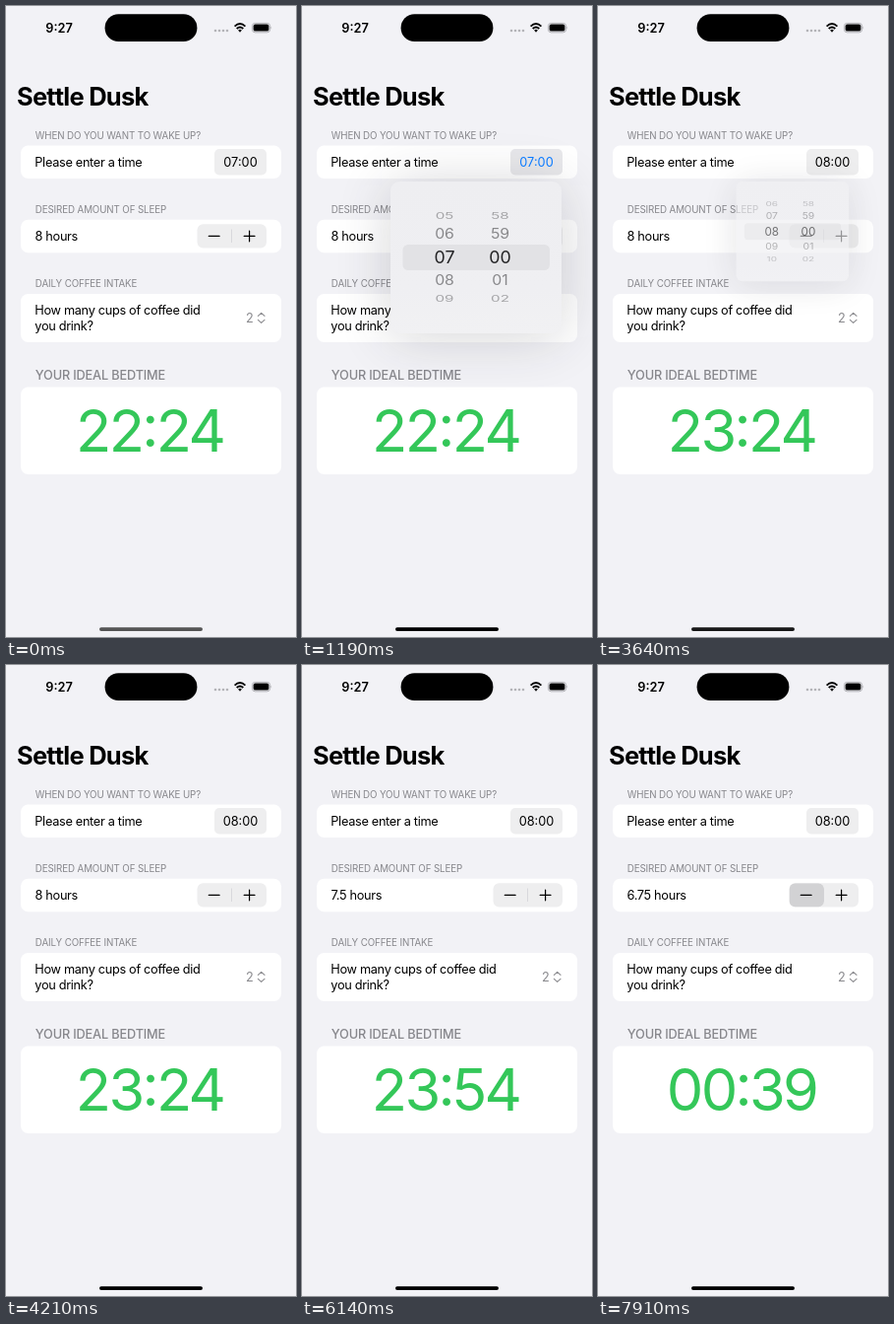
Write an HTML page that moves like this. It is 295 px wide and 640 px high and loops after 8 s.

```html
<!DOCTYPE html>
<html lang="en">
<head>
<meta charset="utf-8">
<title>Settle Dusk</title>
<style>
  html, body { margin: 0; width: 100%; height: 100%; overflow: hidden; background: #f2f2f6; }
  svg { display: block; width: 100%; height: 100%; }
  text { font-family: Inter, Roboto, sans-serif; font-feature-settings: "calt" 0; white-space: pre; }
  .body { font-size: 12.75px; letter-spacing: -0.025em; }
  .head { font-size: 9.75px; letter-spacing: -0.012em; fill: #86868b; }
  .mid { text-anchor: middle; }
</style>
</head>
<body>
<svg id="stage" viewBox="0 0 295 640">
  <defs>
    <filter id="soft" x="-75%" y="-75%" width="250%" height="250%"><feGaussianBlur stdDeviation="28"/></filter>
    <linearGradient id="glass" x1="0" y1="0" x2="0" y2="1">
      <stop offset="0" stop-color="#eeeef1"/>
      <stop offset="0.7" stop-color="#efeff2"/>
      <stop offset="1" stop-color="#f1f1f3"/>
    </linearGradient>
  </defs>
  <rect width="295" height="640" fill="#f2f2f6"/>

  <!-- status bar -->
  <text id="now" class="mid" x="54" y="26.6" font-size="12.75" font-weight="600"></text>
  <rect x="100.6" y="8.3" width="93.8" height="27.7" rx="13.85"/>
  <g fill="#b4b4b8">
    <circle cx="213" cy="25" r="1.3"/><circle cx="217" cy="25" r="1.3"/>
    <circle cx="221" cy="25" r="1.3"/><circle cx="225" cy="25" r="1.3"/>
  </g>
  <g fill="none" stroke="#000" stroke-width="1.9">
    <path d="M232.6 20.6Q238 15.6 243.4 20.6"/>
    <path d="M234.7 23Q238 20 241.3 23"/>
  </g>
  <path d="M236.1 24.6Q238 23 239.9 24.6L238 26.7Z"/>
  <rect x="250.4" y="17.4" width="18.2" height="9.4" rx="3" fill="none" stroke="#a3a3a7" stroke-width="0.8"/>
  <rect x="251.6" y="18.6" width="15.8" height="7" rx="1.9"/>
  <path d="M269.5 20.6q1.4 1.5 0 3z" fill="#a3a3a7"/>

  <text x="11" y="100.5" font-size="25.5" font-weight="700" letter-spacing="-0.03em">Settle Dusk</text>

  <text class="head" x="29.8" y="134.6">WHEN DO YOU WANT TO WAKE UP?</text>
  <text class="head" x="29.8" y="209.8">DESIRED AMOUNT OF SLEEP</text>
  <text class="head" x="29.8" y="285.2">DAILY COFFEE INTAKE</text>
  <text x="29.8" y="378.8" font-size="12.75" font-weight="500" letter-spacing="-0.013em" fill="#86868b">YOUR IDEAL BEDTIME</text>

  <g fill="#fff">
    <rect x="15" y="141.5" width="265" height="33.5" rx="7.5"/>
    <rect x="15" y="216.8" width="265" height="33.4" rx="7.5"/>
    <rect x="15" y="292" width="265" height="49" rx="7.5"/>
    <rect x="15" y="386.5" width="265" height="88.5" rx="7.5"/>
  </g>

  <text class="body" x="29.3" y="163">Please enter a time</text>
  <rect id="chip" x="212" y="145" width="53" height="26.5" rx="5"/>

  <text id="sleep" class="body" x="29.5" y="238.3"></text>
  <rect x="194.5" y="221.3" width="70.5" height="24.2" rx="6" fill="#eeeeef"/>
  <rect x="229.2" y="226.5" width="0.8" height="13.5" fill="#d3d3d7"/>
  <rect id="press"/>
  <path d="M206.3 233.4h10.8M242.2 233.4h10.8M247.6 228v10.8" stroke="#000" stroke-width="1.2" stroke-linecap="round"/>

  <text class="body" x="29.3" y="313">How many cups of coffee did</text>
  <text class="body" x="29.3" y="329.2">you drink?</text>
  <text x="244" y="321" font-size="12.75" fill="#8a8a8e">2</text>
  <path d="M256.4 314.4l3.3-3 3.3 3M256.4 318.4l3.3 3 3.3-3" fill="none" stroke="#8a8a8e" stroke-width="1.1" stroke-linecap="round" stroke-linejoin="round"/>

  <text id="bed" class="mid" x="146.1" y="452.2" font-size="59.5" letter-spacing="-0.045em" fill="#34c759"></text>

  <g id="pop">
    <rect x="90" y="182" width="174" height="154" rx="10" fill="#22222c" opacity="0.19" filter="url(#soft)"/>
    <rect x="90" y="178" width="174" height="154" rx="9.5" fill="url(#glass)"/>
    <rect x="102.5" y="242" width="149.5" height="26" rx="5.5" fill="#e2e2e5"/>
    <g id="wheels" class="mid"></g>
  </g>
  <text id="wake" class="mid" x="238.5" y="163" font-size="12.75"></text>

  <rect id="home" x="95" y="630.2" width="105" height="3.8" rx="1.9"/>
</svg>
<script>
const LOOP = 8000;
const OPEN = [500, 615, 730, 845, 960, 1075, 1190];
const SPIN = [2180, 2290, 2400, 2710];
const CLOSE = [3640, 3750, 3860];
const SETTLE = 4210;
const TAPS = [[5280, 5395, 5510], [5920, 6030, 6140], [6610, 6720, 6830], [7330, 7460, 7570], [7790, 7910]];

const $ = id => document.getElementById(id);
const set = (el, attrs) => { for (const k in attrs) el.setAttribute(k, attrs[k]); };
const pad = n => String(n).padStart(2, "0");
const beats = (t, times) => times.filter(x => x <= t).length;
const easeOut = (x, power) => 1 - Math.pow(1 - x, power);

function write(el, text) {
  if (el.textContent !== text) el.textContent = text;
}

// Time with its colon lifted to the middle of the digits.
function clock(el, text) {
  if (el.textContent === text) return;
  const lift = 0.09 * el.getAttribute("font-size");
  const [h, m] = text.split(":");
  el.innerHTML = `<tspan>${h}</tspan><tspan dy="${-lift}">:</tspan><tspan dy="${lift}">${m}</tspan>`;
}

function makeWheel(x, count) {
  const rows = Array.from({ length: 8 }, () => {
    const el = document.createElementNS("http://www.w3.org/2000/svg", "text");
    $("wheels").append(el);
    return el;
  });
  return pos => rows.forEach((el, i) => {
    const n = Math.floor(pos) - 3 + i, d = n - pos, a = Math.abs(d);
    const angle = d * 0.46;
    const size = a < 1 ? 17.8 - 2 * a : 15.8 - 0.6 * (a - 1);
    const alpha = a < 1 ? 1 - 0.5 * a : a < 2 ? 0.5 - 0.14 * (a - 1) : 0.36 * (3 - a);
    write(el, pad((n + count) % count));
    set(el, {
      transform: `translate(${x} ${254.7 + 53.2 * Math.sin(angle)}) scale(1 ${Math.max(0.05, Math.cos(angle))})`,
      y: size * 0.364,
      "font-size": size,
      fill: "#222224",
      opacity: Math.max(0, alpha)
    });
  });
}

const hourWheel = makeWheel(145, 24);
const minuteWheel = makeWheel(201.5, 60);

function drawPopover(t) {
  const opened = beats(t, OPEN), closed = beats(t, CLOSE);
  const grow = opened < 1 ? 0 : easeOut(Math.min(1, opened / 6), 3);
  const show = grow * Math.pow(1 - closed / CLOSE.length, 1.5);
  const scale = 0.25 + 0.75 * show;
  set($("pop"), {
    opacity: Math.min(1, show * 1.15),
    visibility: show > 0 ? "visible" : "hidden",
    transform: `translate(238 178) scale(${scale}) translate(-238 -178)`
  });
  hourWheel(7 + easeOut(beats(t, SPIN) / SPIN.length, 2));
  minuteWheel(0);

  const active = opened > 0 && closed === 0;
  set($("chip"), { fill: active ? "#e8e8eb" : "#eeeeef" });
  set($("wake"), { fill: active ? "#0a7aff" : "#000" });
  clock($("wake"), closed ? "08:00" : "07:00");

  const dim = closed && t < SETTLE ? 24 : Math.round(85 * (1 - opened / OPEN.length));
  set($("home"), { fill: `rgb(${dim},${dim},${dim})` });
}

function drawStepper(t) {
  const taps = TAPS.filter(tap => tap[0] <= t).length;
  write($("sleep"), 8 - taps * 0.25 + " hours");

  const base = t < CLOSE[0] ? 22 * 60 + 24 : 23 * 60 + 24;
  const bed = (base + taps * 15) % 1440;
  clock($("bed"), pad(Math.floor(bed / 60)) + ":" + pad(bed % 60));

  const phase = taps ? beats(t, TAPS[taps - 1]) : 0;
  const inset = phase === 1 ? 2.2 : 0;
  set($("press"), {
    x: 194.8 + inset, y: 221.6 + inset,
    width: 35 - 2 * inset, height: 23.6 - 2 * inset,
    rx: 5.5 - inset / 2,
    fill: phase === 1 ? "#c8c8ca" : "#d2d2d4",
    visibility: phase === 1 || phase === 2 ? "visible" : "hidden"
  });
}

function draw(t) {
  drawPopover(t);
  drawStepper(t);
}

clock($("now"), "9:27");
draw(0);
const start = performance.now();
function tick() {
  draw((performance.now() - start) % LOOP);
  requestAnimationFrame(tick);
}
requestAnimationFrame(tick);
</script>
</body>
</html>
```
